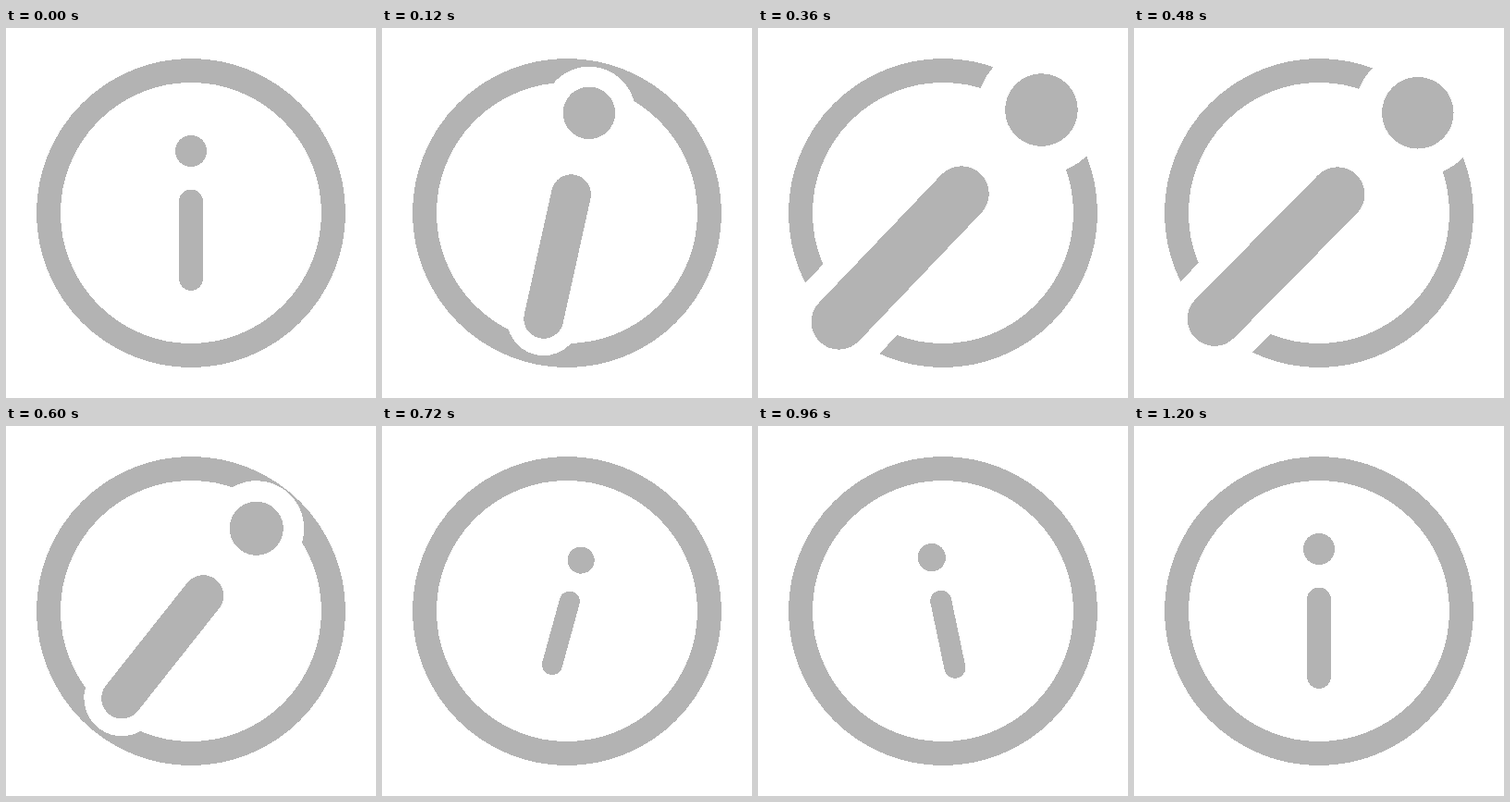
Animation of 400 by 400 pixels, one loop 1.23 s. Source, as an HTML page:

```html
<!DOCTYPE html>
<html lang="en">
<head>
<meta charset="utf-8">
<title>Info icon</title>
<style>
  html, body { margin: 0; width: 100%; height: 100%; overflow: hidden; background: #fff; }
  svg { display: block; width: 100vw; height: 100vh; }
</style>
</head>
<body>
<svg viewBox="0 0 400 400" fill="none" stroke-linecap="round" shape-rendering="crispEdges">
  <circle cx="200" cy="200" r="154" stroke="#b3b3b3" stroke-width="26"/>
  <g id="mark">
    <!-- white clearance that cuts the ring -->
    <circle cy="-67" r="30.3" fill="#fff"/>
    <path d="M0-12.5V70.8" stroke="#fff" stroke-width="48.2"/>
    <circle cy="-67" r="17.1" fill="#b3b3b3"/>
    <path d="M0-12.5V70.8" stroke="#b3b3b3" stroke-width="26"/>
  </g>
</svg>
<script>
  const STEP = 30, LOOP = 1230;
  const mark = document.getElementById('mark');

  // Progress from 0 to 1 between two times, on a cubic Bézier
  // with control points (x1, 0) and (x2, 1)
  function ease(t, start, end, x1, x2) {
    const u = Math.min(1, Math.max(0, (t - start) / (end - start)));
    if (u === 0 || u === 1) return u;
    let lo = 0, hi = 1, p;
    for (let i = 0; i < 24; i++) {
      p = (lo + hi) / 2;
      const q = 1 - p;
      const x = 3 * q * q * p * x1 + 3 * q * p * p * x2 + p * p * p;
      if (x < u) lo = p; else hi = p;
    }
    return p * p * (3 - 2 * p);
  }

  // Grow, shrink past the resting size, settle
  const scaleAt = t => 1
    + 1.3 * ease(t, 0, 270, 0.63, 0.22)
    - 1.55 * ease(t, 450, 750, 0.4, 0.82)
    + 0.25 * ease(t, 750, 1200, 0.25, 0.6);

  // Tilt right, swing back to the left, settle
  const angleAt = t =>
    44.8 * ease(t, 0, 450, 0.4, 0.2)
    - 57.1 * ease(t, 450, 930, 0.64, 0.51)
    + 12.3 * ease(t, 930, 1200, 0.33, 0.67);

  function draw(ms) {
    const t = Math.floor((ms % LOOP) / STEP) * STEP;
    mark.setAttribute('transform',
      `translate(200 200) rotate(${angleAt(t).toFixed(3)}) scale(${scaleAt(t).toFixed(4)})`);
  }

  function tick() {
    draw(performance.now());
    requestAnimationFrame(tick);
  }
  tick();
</script>
</body>
</html>
```
